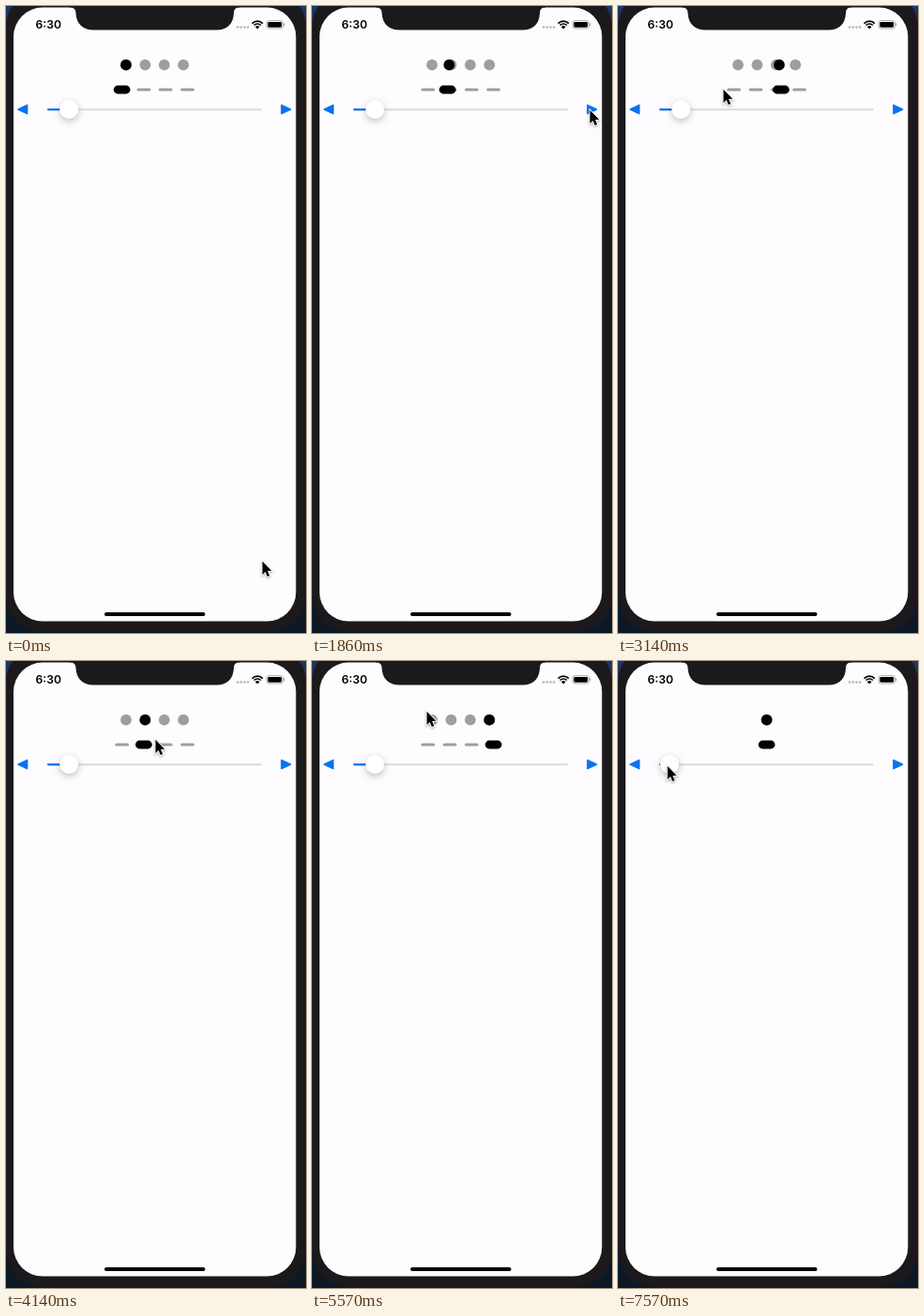
Write an HTML page with a canvas that moves like this. It is 320 by 667 pixels and loops after 8 s.

```html
<!DOCTYPE html>
<html lang="en">
<head>
<meta charset="utf-8">
<title>Page indicator demo</title>
<style>
  html, body { margin: 0; width: 100%; height: 100%; overflow: hidden; background: #101722; }
  canvas { display: block; width: 320px; height: 667px; }
</style>
</head>
<body>
<canvas id="stage"></canvas>
<script>
const W = 320, H = 667, LOOP = 8000, TICK = 1000 / 7;
const INK = '#000', GRAY = '#9f9da0', BLUE = '#0a72f0', PAPER = '#fefcff', BEZEL = '#1b191b';
const MID = 158.6, KNOB_MIN = 54.9, KNOB_STEP = 3.7, TAP_TIME = 2;

const canvas = document.getElementById('stage');
const ctx = canvas.getContext('2d');
const dpr = window.devicePixelRatio || 1;
canvas.width = W * dpr;
canvas.height = H * dpr;

// Moves are { from, to, pos }, timed in ticks of a seventh of a second.
const go = (from, to, ...pos) => ({ from, to, pos });
const tap = (from, page) => go(from, from + TAP_TIME, page);

const nextTaps = [1, 2, 3].map(page => tap(8.9 + page * 2.5, page));
const pageMoves = [...nextTaps, tap(21.3, 0), tap(24.3, 1), tap(31.4, 3), tap(39.4, 0)];
const knobMoves = [go(46, 49.5, 57.5), go(51, 52, 54.4), go(52, 53, 55)];
const cursorMoves = [
  go(0, 2, 175, 180),
  go(3, 8, 265, 100), go(8, 10, 297, 111),    // next button
  go(17, 19, 172, 89), go(19, 22, 113, 89),   // first dash
  go(23, 25, 148, 89),                        // second dash
  go(28, 29, 160, 84), go(29, 32, 201, 89),   // last dash
  go(33, 36, 114, 58), go(36, 39, 123, 54),   // first dot
  go(40, 43, 66.5, 112), go(46, 49.5, 57, 112), go(51, 52, 53.3, 112) // slider
];

const clamp = v => Math.min(1, Math.max(0, v));
const ease = k => k * k * (3 - 2 * k);

function follow(moves, start, t) {
  return moves.reduce((now, m) => {
    const k = ease(clamp((t - m.from) / (m.to - m.from)));
    return now.map((v, i) => v + (m.pos[i] - v) * k);
  }, start);
}

function box(x, y, w, h, r, color) {
  ctx.beginPath();
  ctx.roundRect(x, y, w, h, r);
  ctx.fillStyle = color;
  ctx.fill();
}

function disc(x, y, r, color) {
  ctx.beginPath();
  ctx.arc(x, y, r, 0, Math.PI * 2);
  ctx.fillStyle = color;
  ctx.fill();
}

function poly(points) {
  ctx.beginPath();
  points.forEach(([x, y]) => ctx.lineTo(x, y));
  ctx.closePath();
}

function drawPhone() {
  const desk = ctx.createLinearGradient(0, 0, 0, H);
  desk.addColorStop(0, '#1b3768');
  desk.addColorStop(.1, '#16203a');
  desk.addColorStop(1, '#0c1826');
  ctx.fillStyle = desk;
  ctx.fillRect(0, 0, W, H);
  box(0, -16, 320, 682, 38, BEZEL);
  box(8, 1.6, 301.3, 652.9, 31, PAPER);

  ctx.beginPath();
  ctx.moveTo(68, 0);
  ctx.lineTo(68, 1.6);
  ctx.quadraticCurveTo(74.5, 1.6, 74.5, 7.5);
  ctx.bezierCurveTo(75, 19, 82, 25.5, 93, 25.5);
  ctx.lineTo(225, 25.5);
  ctx.bezierCurveTo(236, 25.5, 242.5, 19, 243, 7.5);
  ctx.quadraticCurveTo(243, 1.6, 249, 1.6);
  ctx.lineTo(249, 0);
  ctx.fillStyle = BEZEL;
  ctx.fill();
  box(105, 645, 107.5, 4, 2, INK);
}

function drawStatus() {
  ctx.fillStyle = INK;
  ctx.font = '600 12.2px Inter, sans-serif';
  ctx.textAlign = 'center';
  ctx.fillText('6:30', 45.3, 24.2);
  for (let i = 0; i < 4; i++) disc(247 + i * 3.7, 22.6, 1.4, '#bcbabd');

  ctx.strokeStyle = INK;
  ctx.lineWidth = 1.7;
  for (const r of [8, 5.2]) {
    ctx.beginPath();
    ctx.arc(268.2, 24.2, r, -Math.PI * .75, -Math.PI * .25);
    ctx.stroke();
  }
  ctx.beginPath();
  ctx.moveTo(268.2, 24.4);
  ctx.arc(268.2, 24.4, 3.2, -Math.PI * .75, -Math.PI * .25);
  ctx.fillStyle = INK;
  ctx.fill();

  ctx.beginPath();
  ctx.roundRect(278, 15.6, 17.4, 8.4, 2.5);
  ctx.strokeStyle = '#a3a1a4';
  ctx.lineWidth = .9;
  ctx.stroke();
  box(279.3, 16.9, 14.8, 5.8, 1.4, INK);
  box(296.2, 18.3, 1.1, 3, .6, '#a3a1a4');
}

function drawArrow(x, dir, pressed) {
  poly([[x + dir * 5, 110], [x - dir * 4.6, 105.4], [x - dir * 4.6, 114.6]]);
  ctx.fillStyle = ctx.strokeStyle = pressed ? '#84b7f7' : BLUE;
  ctx.lineWidth = 1.5;
  ctx.lineJoin = 'round';
  ctx.fill();
  ctx.stroke();
}

function drawIndicators(count, page) {
  if (!count) return;
  const place = (i, gap) => MID + (i - (count - 1) / 2) * gap;
  for (let i = 0; i < count; i++) {
    disc(place(i, 20.4), 62.7, 5.9, GRAY);
    box(place(i, 23.3) - 7.4, 87.5, 14.8, 3, 1.5, GRAY);
  }
  disc(place(page, 20.4), 62.7, 5.9, INK);
  box(place(page, 23.3) - 8.9, 84.6, 17.8, 8.8, 4.4, INK);
}

function drawSlider(x) {
  box(44, 109, 229, 2.2, 1.1, '#dfdde0');
  box(44, 109, x - 44, 2.2, 1.1, BLUE);
  ctx.save();
  ctx.shadowColor = 'rgba(0,0,0,.24)';
  ctx.shadowBlur = 7 * dpr;
  ctx.shadowOffsetY = 2.5 * dpr;
  disc(x, 110, 10, '#fff');
  ctx.restore();
}

function drawCursor(x, y) {
  ctx.save();
  ctx.translate(x - .5, y - .2);
  ctx.scale(.94, .94);
  poly([[0, 0], [0, 15], [3.4, 11.9], [5.6, 17.3], [8.2, 16.2], [5.9, 10.8], [10.4, 10.6]]);
  ctx.lineJoin = 'miter';
  ctx.lineWidth = 2;
  ctx.strokeStyle = '#fff';
  ctx.shadowColor = 'rgba(0,0,0,.35)';
  ctx.shadowBlur = 2.5 * dpr;
  ctx.shadowOffsetY = dpr;
  ctx.stroke();
  ctx.shadowColor = 'transparent';
  ctx.fillStyle = INK;
  ctx.fill();
  ctx.restore();
}

function draw(ms) {
  const t = Math.floor((ms % LOOP + 5) / TICK) % 56;
  const [knob] = follow(knobMoves, [67.2], t);
  const [page] = follow(pageMoves, [0], t);
  const count = Math.max(0, Math.ceil((knob - KNOB_MIN) / KNOB_STEP));
  const pressed = nextTaps.some(m => Math.abs(t - m.from) < .8);

  ctx.setTransform(dpr, 0, 0, dpr, 0, 0);
  drawPhone();
  drawStatus();
  drawIndicators(count, page);
  drawSlider(knob);
  drawArrow(18, -1, false);
  drawArrow(298.5, 1, pressed);
  drawCursor(...follow(cursorMoves, [274, 591], t));
}

const start = performance.now();
function frame() {
  draw(performance.now() - start);
  requestAnimationFrame(frame);
}
frame();
</script>
</body>
</html>
```
